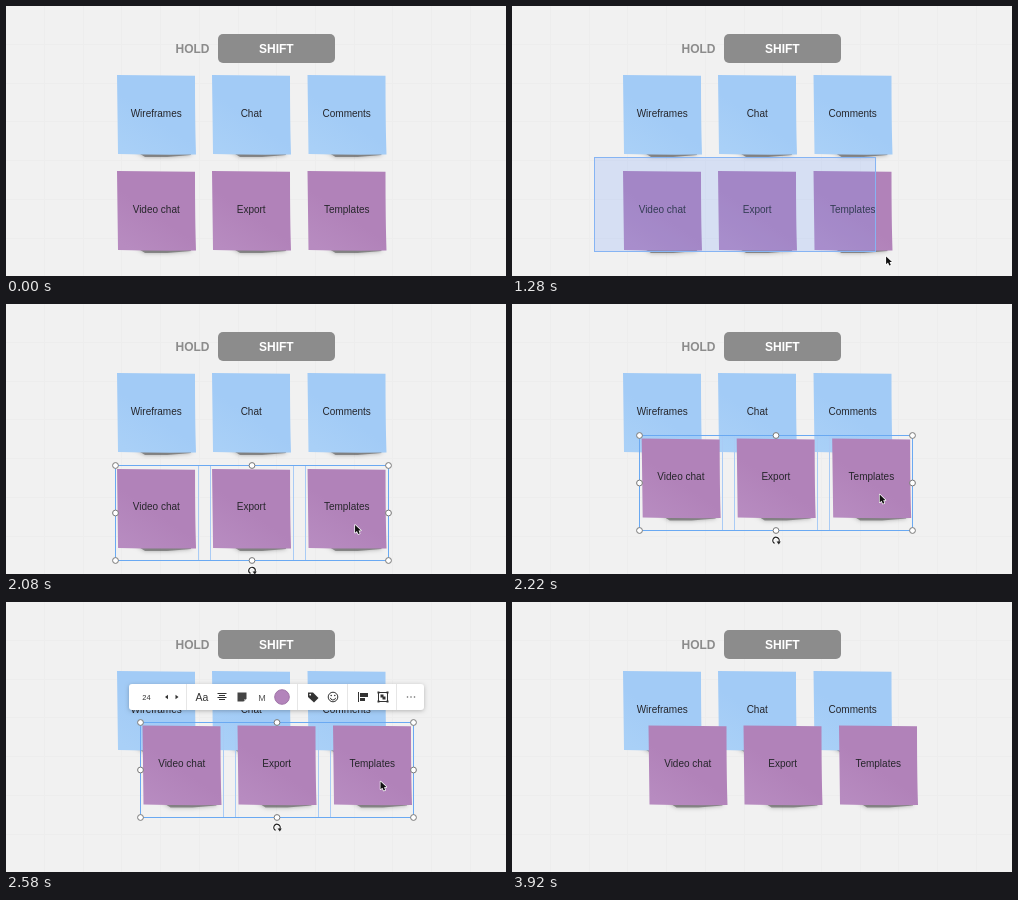
Write an HTML page with a canvas that moves like this. It is 500 by 270 pixels and loops after 3940 ms.

```html
<!DOCTYPE html>
<html lang="en">
<head>
<meta charset="utf-8">
<title>Multi-select notes</title>
<style>
  html, body { margin: 0; width: 100%; height: 100%; overflow: hidden; background: #f1f1f1; }
  canvas { display: block; width: 500px; height: 270px; }
</style>
</head>
<body>
<canvas id="stage"></canvas>
<script>
const W = 500, H = 270, LOOP = 3940;
const FONT = '"Liberation Sans", Arial, sans-serif';
const NOTE_X = [111, 206, 301.5];
const BLUE = ['#a2cbf6', '#a9d0f7'];
const PURPLE = ['#b182b9', '#b78bc0'];
const GRAB = [349, 221], DROP = [25.5, -41.5];

const canvas = document.getElementById('stage');
const ratio = window.devicePixelRatio || 1;
canvas.width = W * ratio;
canvas.height = H * ratio;
const ctx = canvas.getContext('2d');

const ease = p => p < .5 ? 4 * p ** 3 : 1 - 4 * (1 - p) ** 3;
const easeOut = p => 1 - (1 - p) ** 2;
const span = (t, from, to) => Math.min(1, Math.max(0, (t - from) / (to - from)));
const mix = (a, b, p) => [a[0] + (b[0] - a[0]) * p, a[1] + (b[1] - a[1]) * p];

function text(label, x, y, size, color, weight = 'normal') {
  ctx.font = `${weight} ${size}px ${FONT}`;
  ctx.textAlign = 'center';
  ctx.fillStyle = color;
  ctx.fillText(label, x, y);
}

function poly(points, fill, stroke) {
  ctx.beginPath();
  points.forEach(([x, y]) => ctx.lineTo(x, y));
  ctx.closePath();
  if (stroke) { ctx.strokeStyle = stroke; ctx.stroke(); }
  if (fill) { ctx.fillStyle = fill; ctx.fill(); }
}

function line(x1, y1, x2, y2) {
  ctx.beginPath();
  ctx.moveTo(x1, y1);
  ctx.lineTo(x2, y2);
  ctx.stroke();
}

function disc(x, y, r, fill, stroke) {
  ctx.beginPath();
  ctx.arc(x, y, r, 0, Math.PI * 2);
  if (fill) { ctx.fillStyle = fill; ctx.fill(); }
  if (stroke) { ctx.strokeStyle = stroke; ctx.stroke(); }
}

function roundBox(x, y, w, h, r, fill) {
  ctx.beginPath();
  ctx.roundRect(x, y, w, h, r);
  ctx.fillStyle = fill;
  ctx.fill();
}

function drawBoard() {
  ctx.fillStyle = '#f1f1f1';
  ctx.fillRect(0, 0, W, H);
  ctx.strokeStyle = '#ededed';
  ctx.lineWidth = 1;
  for (let x = 38.5; x < W; x += 38.7) line(Math.floor(x) + .5, 0, Math.floor(x) + .5, H);
  for (let y = 38.5; y < H; y += 38.7) line(0, Math.floor(y) + .5, W, Math.floor(y) + .5);
  text('HOLD', 186.5, 47, 12, '#8c8c8c', 'bold');
  roundBox(212, 28, 117, 29, 5, '#8c8c8c');
  text('SHIFT', 270.3, 46.5, 12, '#fff', 'bold');
}

function drawNote(x, y, label, [base, light]) {
  ctx.save();
  ctx.shadowColor = 'rgba(0,0,0,.5)';
  ctx.shadowBlur = 4 * ratio;
  poly([[x + 9, y + 70], [x + 72, y + 70], [x + 74, y + 80], [x + 50, y + 82], [x + 28, y + 82]], 'rgba(90,90,90,.6)');
  ctx.restore();

  const shade = ctx.createLinearGradient(x + 70, y, x + 15, y + 80);
  shade.addColorStop(0, base);
  shade.addColorStop(.55, base);
  shade.addColorStop(1, light);
  ctx.beginPath();
  ctx.moveTo(x, y);
  ctx.lineTo(x + 78, y + .8);
  ctx.quadraticCurveTo(x + 78, y + 50, x + 79, y + 79.5);
  ctx.quadraticCurveTo(x + 40, y + 80, x + 1, y + 79);
  ctx.closePath();
  ctx.fillStyle = shade;
  ctx.fill();
  text(label, x + 39.2, y + 41.5, 10, '#26262b');
}

function drawRow(labels, dx, y, colors) {
  labels.forEach((label, i) => drawNote(NOTE_X[i] + dx, y, label, colors));
}

function drawMarquee([x, y]) {
  ctx.fillStyle = 'rgba(105,150,250,.2)';
  ctx.fillRect(83, 152, x - 83, y - 152);
  ctx.strokeStyle = '#86b4f3';
  ctx.lineWidth = 1;
  ctx.strokeRect(82.5, 151.5, Math.round(x - 83), Math.round(y - 152));
}

function drawRotate(x, y) {
  for (const [color, width] of [['#fff', 3], ['#222', 1.2]]) {
    ctx.strokeStyle = color;
    ctx.lineWidth = width;
    ctx.beginPath();
    ctx.arc(x, y, 3.2, Math.PI * .65, Math.PI * 2.15);
    ctx.stroke();
  }
  poly([[x + .6, y + 1], [x + 4.8, y + 1], [x + 2.8, y + 4]], '#222');
}

function drawSelection(dx, dy) {
  const x = Math.round(108.5 + dx) + .5, y = Math.round(161 + dy) + .5;
  ctx.lineWidth = 1;
  ctx.strokeStyle = '#a9cbf5';
  for (const [left, width] of [[0, 83], [94.5, 83], [190, 83]]) ctx.strokeRect(x + Math.round(left), y, width, 95);
  ctx.strokeStyle = '#6aa9f2';
  ctx.strokeRect(x, y, 273, 95);
  for (const i of [0, .5, 1]) {
    for (const j of [0, .5, 1]) {
      const onEdge = i !== .5 || j !== .5;
      if (onEdge) disc(x + 273 * i, y + 95 * j, 2.9, '#fff', '#777');
    }
  }
  drawRotate(x + 136.5, y + 105);
}

function drawToolbar(x, y) {
  ctx.save();
  ctx.translate(Math.round(x), Math.round(y));
  ctx.save();
  ctx.shadowColor = 'rgba(0,0,0,.25)';
  ctx.shadowBlur = 4 * ratio;
  ctx.shadowOffsetY = ratio;
  roundBox(0, 0, 295, 26, 3, '#fff');
  ctx.restore();

  const ink = '#333';
  ctx.lineWidth = 1;
  ctx.strokeStyle = '#e6e6e6';
  for (const d of [57.5, 168.5, 218.5, 267.5]) line(d, 0, d, 26);

  text('24', 17.5, 16, 7.5, ink);
  poly([[36, 13], [39, 10.8], [39, 15.2]], ink);
  poly([[49.5, 13], [46.5, 10.8], [46.5, 15.2]], ink);
  text('Aa', 73, 17, 10.5, ink);

  ctx.strokeStyle = ink;
  [[4.5, 9.5], [3, 11.5], [4.5, 13.5], [3, 15.5]].forEach(([half, row]) => line(93 - half, row, 93 + half, row));

  poly([[108.5, 8.5], [117.5, 8.5], [117.5, 14.5], [114.5, 17.5], [108.5, 17.5]], '#444');
  poly([[115, 17.5], [115, 15], [117.5, 15]], '#999');
  text('M', 133, 16.5, 9, '#555');
  disc(153, 13, 7.3, '#b384bb', '#a074a8');

  poly([[179, 8.5], [184, 8.5], [189.5, 14], [185, 18.5], [179, 13]], ink);
  disc(181.2, 10.7, .9, '#fff');

  disc(204, 13, 4.8, null, ink);
  disc(202.2, 11.5, .8, ink);
  disc(205.8, 11.5, .8, ink);
  ctx.beginPath();
  ctx.arc(204, 13.3, 2.7, .2, Math.PI - .2);
  ctx.stroke();

  line(229.5, 8, 229.5, 18);
  ctx.fillStyle = ink;
  ctx.fillRect(231, 9, 8, 4);
  ctx.fillRect(231, 14, 5, 3);

  ctx.strokeRect(249.5, 8.5, 9, 9);
  ctx.fillRect(251.5, 10.5, 3, 3);
  ctx.fillRect(253.5, 12.5, 3, 3);
  for (const [cx, cy] of [[249, 8], [258, 8], [249, 17], [258, 17]]) ctx.fillRect(cx - .5, cy - .5, 2, 2);

  for (const dot of [278.5, 282, 285.5]) disc(dot, 13, .8, '#666');
  ctx.restore();
}

function drawCursor([x, y]) {
  ctx.save();
  ctx.translate(x, y);
  ctx.lineWidth = 1.4;
  ctx.lineJoin = 'round';
  poly([[0, 0], [0, 7.8], [1.9, 6.2], [3.2, 9.1], [4.7, 8.5], [3.5, 5.7], [5.9, 5.6]], '#111', '#fff');
  ctx.restore();
}

function marqueeCorner(t) {
  const p = ease(span(t, 970, 1420));
  return [83 + 330 * p, 151 + 117 * p ** 1.3];
}

function cursorAt(t, dx, dy) {
  if (t < 960) return mix([-8, 176], [83, 151], easeOut(span(t, 60, 580)));
  if (t < 1660) return marqueeCorner(t);
  if (t < 2040) return mix([413, 268], GRAB, ease(span(t, 1660, 2010)));
  const held = [GRAB[0] + dx, GRAB[1] + dy];
  return mix(held, [508, 186], ease(span(t, 2600, 3080)));
}

function draw(t) {
  const dropped = ease(span(t, 2060, 2331));
  const dx = DROP[0] * dropped, dy = DROP[1] * dropped;
  const selected = t >= 1540 && t < 3500;
  const toolbar = selected && ((t >= 1860 && t < 2060) || t >= 2480);

  ctx.setTransform(ratio, 0, 0, ratio, 0, 0);
  drawBoard();
  drawRow(['Wireframes', 'Chat', 'Comments'], 0, 69, BLUE);
  drawRow(['Video chat', 'Export', 'Templates'], dx, 165 + dy, PURPLE);
  if (t >= 980 && t < 1540) drawMarquee(marqueeCorner(t - 11));
  if (selected) drawSelection(dx, dy);
  if (toolbar) drawToolbar(97.5 + dx, 123.5 + dy);
  if (t >= 60 && t < 3100) drawCursor(cursorAt(t, dx, dy));
}

const start = performance.now();
function tick() {
  draw((performance.now() - start) % LOOP);
  requestAnimationFrame(tick);
}
tick();
</script>
</body>
</html>
```
